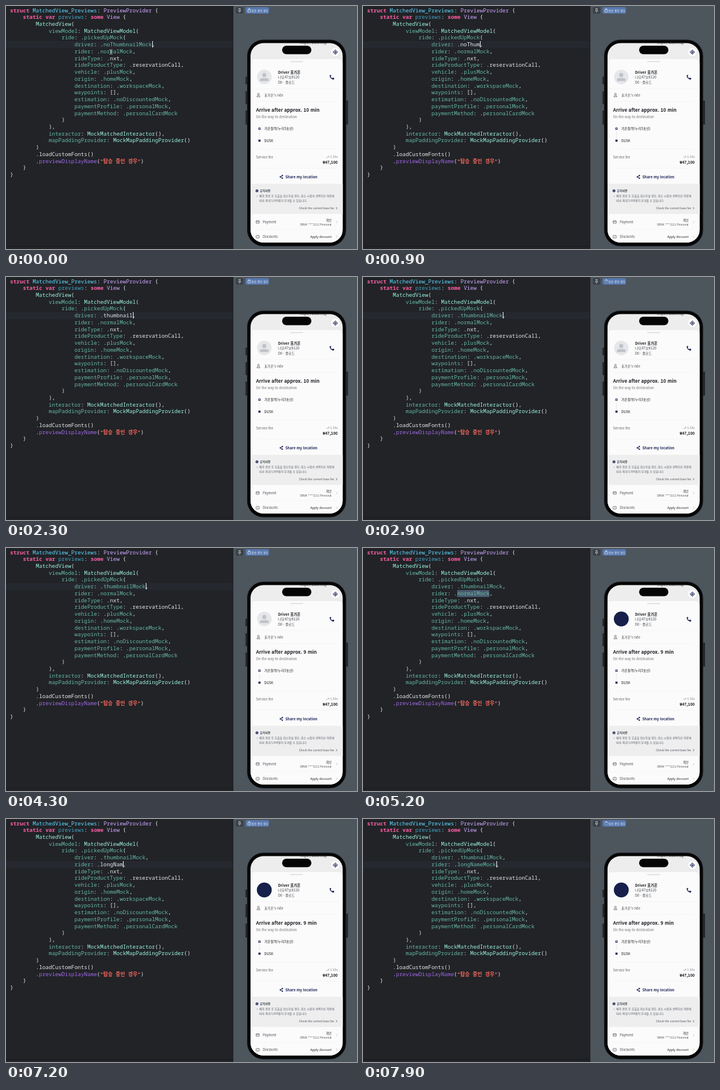
These frames come from a looping animation (600x416 px, 8 s). An HTML page:

```html
<!DOCTYPE html>
<html lang="ko">
<head>
<meta charset="utf-8">
<style>
html, body { margin: 0; width: 100%; height: 100%; overflow: hidden; background: #212327; }
#stage { position: relative; width: 600px; height: 416px; overflow: hidden; }
#stage > * { position: absolute; }
pre { left: 7px; top: 1.5px; margin: 0; color: #e6e7e9; font: 500 9.19px/11.74px "Noto Sans Mono", "Noto Sans CJK KR", monospace; font-variant-ligatures: none; }
.key { color: #fc5fa3; font-weight: 700; }
.str { color: #fc6a5d; font-size: 8.7px; font-weight: 700; line-height: 0; }
.decl { color: #5dd8ff; }
.prop { color: #41a1c0; }
.sys { color: #d0a8ff; }
.call { color: #a167e6; }
.type { color: #9ef1dd; }
.fn { color: #67b7a4; }
#line { left: 0; width: 388px; height: 11.8px; background: #25292f; }
#pick { left: 161px; top: 72px; width: 55px; height: 12px; background: #48596c; }
#caret { width: 1px; height: 11px; background: #fff; }
#foot { left: 0; top: 411px; width: 388px; height: 1px; background: #1a1b1e; }
svg { left: 0; top: 0; }
svg text { font-family: "Noto Sans CJK KR", "Noto Sans", sans-serif; }
.end { text-anchor: end; }
.b { font-weight: 700; }
.m { font-weight: 500; }
</style>
</head>
<body>
<div id="stage">
  <div id="line"></div>
  <div id="pick"></div>
  <pre id="code"></pre>
  <div id="caret"></div>
  <div id="foot"></div>
  <svg width="600" height="416" fill="none">
    <defs><clipPath id="screen"><rect x="418" y="63.500" width="157.500" height="341.500" rx="22"/></clipPath></defs>
    <path id="mouse" d="M177 74.500q2 0 2.500 1q.5-1 2.500-1M179.500 75.500v6M177 82.500q2 0 2.500-1q.5 1 2.500 1" stroke="#d8d8d8" stroke-width=".9"/>

    <!-- preview canvas and its toolbar -->
    <path fill="#4d555d" d="M388 0h212v416H388z"/>
    <path fill="#17181b" d="M387.500 0h1v416h-1z"/>
    <rect x="393" y="2" width="12.500" height="11" rx="2" fill="#3a4047"/>
    <path d="M397.300 4.500h4M398.300 4.500v2.500l-1.300 1.500h4.600l-1.300-1.500v-2.500M399.300 8.500v3" stroke="#c9cdd2" stroke-width=".8"/>
    <rect x="409.500" y="2" width="40" height="11" rx="2.500" fill="#5879b0"/>
    <g id="lock" stroke="#eef2f8" stroke-width=".8"><rect x="413.500" y="6.500" width="4.500" height="3.800" rx=".6"/><path d="M414.500 6.500v-1a1.250 1.250 0 0 1 2.500 0v1"/></g>
    <g id="spin"><circle cx="415.700" cy="7.500" r="2.500" stroke="#7f9ac6" stroke-width="1"/><path d="M415.700 5a2.500 2.500 0 0 1 2.500 2.500" stroke="#fff" stroke-width="1"/></g>
    <text x="419.800" y="9.500" font-size="4.700" class="m" fill="#f2f5fa">탑승 중인 경우</text>

    <!-- phone body -->
    <path d="M411 121v13M411 146v22M411 179v24M583 162v41" stroke="#202327" stroke-width="3"/>
    <rect x="412.500" y="58" width="168.500" height="353" rx="27.500" fill="#050506" stroke="#1d2023"/>
    <g clip-path="url(#screen)">
      <path fill="#ededee" d="M418 63h158v353H418z"/>
      <text x="503" y="64.800" font-size="5.500" class="m" fill="#222">https://www.map</text>
      <path fill="#fbfbfb" d="M418 98q0-7 7-7h143.500q7 0 7 7v318H418z"/>
      <path fill="#eeeeef" d="M418 304.500h158v51.500H418z"/>
      <path d="M418 141.500h158M428 163.500h137M428 244.500h137M428 277.500h137M428 382.500h137" stroke="#f3f4f4" stroke-width=".7"/>
    </g>
    <rect x="472" y="68" width="50" height="14.500" rx="7.250" fill="#050506"/>
    <rect x="485.500" y="94.500" width="22.500" height="1.600" rx=".8" fill="#d9dbde"/>
    <circle cx="563" cy="79.500" r="7.800" fill="#d8dade"/>
    <circle cx="563" cy="79" r="7.500" fill="#fff"/>
    <g stroke="#1e2558"><circle cx="563" cy="79" r="2.900" stroke-width=".9"/><path d="M563 74.500v1.600M563 81.900v1.600M558.500 79h1.600M565.900 79h1.600" stroke-width=".9"/></g>
    <circle cx="563" cy="79" r="1.500" fill="#1e2558"/>

    <!-- driver -->
    <circle cx="441.500" cy="121.500" r="12.500" fill="#e5e7ea"/>
    <g fill="#bfc3c9"><rect x="438.200" y="114.500" width="6.600" height="7.200" rx="3"/><path d="M434 128.500v-2q0-3 4-3h7q4 0 4 3v2z"/></g>
    <circle id="badge" cx="441.500" cy="121.500" r="12.700" fill="#17204a"/>
    <path d="M554.500 118q-1.500.5-1.200 2q1 4.500 5.700 5.900q1.600.2 2-1.500l.1-.8-2.300-1-1.200 1.100q-1.800-.8-2.700-2.700l1.100-1.100-.8-2.100z" fill="#1e2558"/>
    <g fill="#1b1d22">
      <text x="465" y="115.700" font-size="6.300" class="b">Driver 표가온</text>
      <text x="465" y="124.400" font-size="6" fill="#3f434a">나모47보8120</text>
      <text x="465" y="133.200" font-size="5.800" fill="#3f434a">D0 - 플로드</text>
      <text x="441.500" y="154.700" font-size="5.750" fill="#474b52">표가온's ride</text>
      <text x="427.500" y="180.900" font-size="8.150" class="b">Arrive after approx. <tspan id="eta">10</tspan> min</text>
      <text x="427.500" y="192.200" font-size="5.750" fill="#6d7178">On the way to destination</text>
      <text x="441.500" y="212.200" font-size="5.800" class="m">가온들역(누리3호선)</text>
      <text x="441.500" y="232.700" font-size="5.800" class="m">DUSK</text>
      <text x="427.500" y="261.200" font-size="5.700" fill="#5c6067">Service fee</text>
      <text x="567" y="260.200" font-size="5.200" class="end" fill="#777b83">1.53x</text>
      <text x="567" y="269.800" font-size="6.600" class="b end">₩47,100</text>
      <text x="477.500" y="294.800" font-size="6.100" class="b" fill="#1e2558">Share my location</text>
      <text x="434" y="318.300" font-size="4.900" class="b" fill="#33373d">유의사항</text>
      <g font-size="4.800" fill="#5c6067">
        <text x="428.500" y="327">•</text>
        <text x="433" y="327">배차 완료 후 호출을 취소하실 경우, 취소 시점과 선택하신 차량에</text>
        <text x="433" y="335">따라 최대 5,000원이 부과될 수 있습니다.</text>
        <text x="561" y="347.900" class="end" fill="#474b52">Check the current base fee</text>
      </g>
      <text x="439" y="372.200" font-size="5.600" fill="#474b52">Payment</text>
      <text x="556.500" y="368.500" font-size="5.200" class="end">개인</text>
      <text x="556.500" y="376.300" font-size="4.800" class="end" fill="#474b52">ORVA ****1111 Personal</text>
      <text x="439" y="397.200" font-size="5.600" fill="#474b52">Discounts</text>
      <text x="556.500" y="397.200" font-size="5.200" class="m end">Apply discount</text>
    </g>

    <!-- small icons -->
    <g stroke="#5c6067" stroke-width=".8">
      <circle cx="431.500" cy="150.800" r="1.500"/><path d="M429 155.500v-1q0-1.500 2.500-1.500t2.500 1.500v1z"/>
      <rect x="427.500" y="367.500" width="5.500" height="4.500" rx=".6"/><path d="M427.500 369.300h5.500"/>
      <rect x="427.500" y="392.800" width="5.500" height="4.400" rx=".6"/><path d="M430.300 393.500v3" stroke-dasharray=".8 .6"/>
      <path d="M547.500 260l1.500-1.500 1 1 2-2.300M550.500 257h1.600v1.600" stroke="#8a8e96" stroke-width=".7"/>
      <path d="M564.200 344.300l1.700 1.800-1.700 1.800" stroke="#474b52"/>
      <path d="M564.500 368l1.800 2-1.800 2M564.500 393l1.800 2-1.800 2" stroke="#c0c3c8"/>
    </g>
    <path d="M433.200 215v11" stroke="#b5b8c4" stroke-width=".8" stroke-dasharray="1 1.800"/>
    <rect x="431.900" y="208.700" width="2.700" height="2.700" stroke="#1e2558" stroke-width="1"/>
    <path d="M431.500 228.700h3.600v3.600h-3.600z" fill="#1e2558"/>
    <path d="M472.500 290.500l-3.500 2 3.500 2" stroke="#1e2558" stroke-width=".8"/>
    <g fill="#1e2558"><circle cx="472.300" cy="290.300" r="1.200"/><circle cx="469" cy="292.500" r="1.200"/><circle cx="472.300" cy="294.700" r="1.200"/></g>
    <circle cx="429" cy="316.400" r="2.400" fill="#252c5e"/>
    <path d="M429 315v1.700M429 317.200v.7" stroke="#fff" stroke-width=".7"/>
  </svg>
</div>
<script>
const LOOP = 8000, COL = 5.515, ROW = 11.74;
const el = id => document.getElementById(id);
const show = (id, on) => el(id).style.visibility = on ? 'visible' : 'hidden';

const source = (driver, rider) => `struct MatchedView_Previews: PreviewProvider {
    static var previews: some View {
        MatchedView(
            viewModel: MatchedViewModel(
                ride: .pickedUpMock(
                    driver: .${driver},
                    rider: .${rider},
                    rideType: .nxt,
                    rideProductType: .reservationCall,
                    vehicle: .plusMock,
                    origin: .homeMock,
                    destination: .workspaceMock,
                    waypoints: [],
                    estimation: .noDiscountedMock,
                    paymentProfile: .personalMock,
                    paymentMethod: .personalCardMock
                )
            ),
            interactor: MockMatchedInteractor(),
            mapPaddingProvider: MockMapPaddingProvider()
        )
        .loadCustomFonts()
        .previewDisplayName("탑승 중인 경우")
    }
}`;

const kinds = [
  ['str', /^"/],
  ['key', /^(struct|static|var|some)$/],
  ['decl', /^MatchedView_Previews$/],
  ['prop', /^previews$/],
  ['sys', /^(PreviewProvider|View)$/],
  ['call', /^previewDisplayName$/],
  ['plain', /^(nxt|reservationCall|loadCustomFonts)$/],
  ['type', /^[A-Z]/],
  ['fn', /./]
];
// A leading ~ marks a word still being typed, which stays uncoloured.
const paint = text => text.replace(/~\w*|"[^"]*"|\w+/g, word => word[0] === '~'
  ? word.slice(1)
  : `<span class="${kinds.find(k => k[1].test(word))[0]}">${word}</span>`);

const typed = (word, t, start, step) =>
  word.slice(0, Math.max(0, Math.min(word.length, Math.floor((t - start) / step) + 1)));

function driverAt(t) {
  const old = 'noThumbnailMock';
  if (t < 1450) return old.slice(0, old.length - typed(old, t, 500, 50).length);
  return typed('thumbnailMock', t, 1560, 85);
}
const riderAt = t => t < 6750 ? 'normalMock' : typed('longNameMock', t, 6750, 75);
const mark = word => /Mock$/.test(word) ? word : '~' + word;

let last = '';
function draw(t) {
  const driver = driverAt(t), rider = riderAt(t);
  const text = source(mark(driver), mark(rider));
  if (text !== last) el('code').innerHTML = paint(last = text);

  const picked = t >= 4900 && t < 6750, onRider = t >= 4900;
  const row = onRider ? 6 : 5;
  const col = onRider ? 28 + rider.length : 29 + driver.length;
  el('line').style.top = 1.5 + row * ROW + 'px';
  el('caret').style.top = Math.round(1.6 + row * ROW) + 'px';
  el('caret').style.left = Math.round(7 + col * COL) + 'px';
  const idle = t < 500 ? t : t - 2600;
  show('line', !picked);
  show('pick', picked);
  show('caret', !picked && (onRider || idle < 0 || idle % 800 < 450));
  show('mouse', t < 500);

  const building = t >= 2700 && t < 3900 || t >= 7750;
  show('lock', !building);
  show('spin', building);
  el('spin').setAttribute('transform', `rotate(${t * .36 % 360} 415.7 7.5)`);
  el('eta').textContent = t < 3900 ? '10' : '9';
  show('badge', t >= 4500);
}

const begin = performance.now();
function tick() {
  draw((performance.now() - begin) % LOOP);
  requestAnimationFrame(tick);
}
tick();
</script>
</body>
</html>
```
